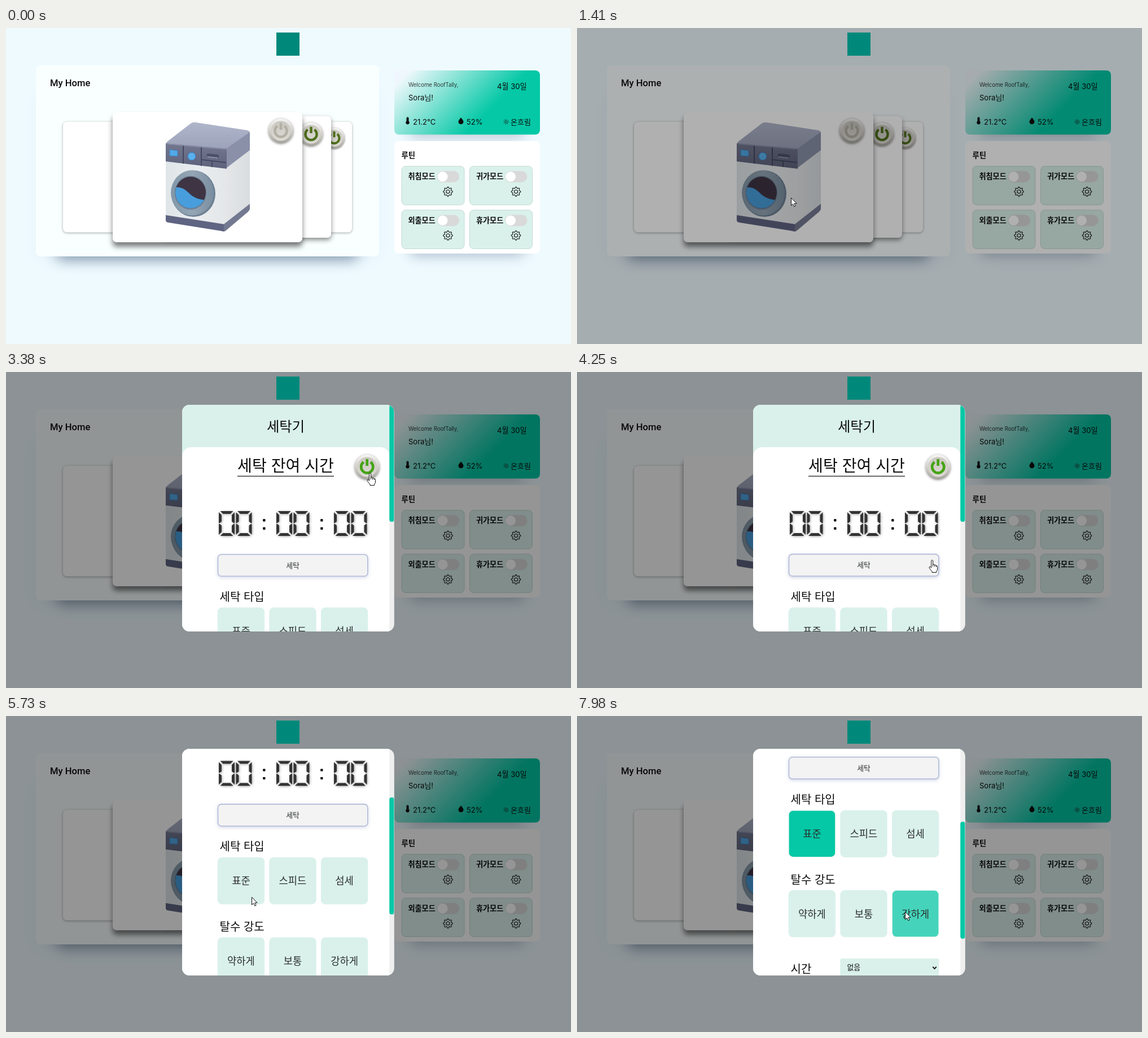
An HTML page for the animation above (8000 ms loop, 1001 by 559 pixels).

```html
<!DOCTYPE html>
<html lang="ko">
<head>
<meta charset="utf-8">
<title>Smart home</title>
<style>
html, body { margin: 0; width: 100%; height: 100%; overflow: hidden; background: #effaff; }
svg { display: block; width: 100vw; height: 100vh; }
text { font-family: Inter, "Noto Sans CJK KR", "Noto Sans CJK", sans-serif; fill: #0b0b0b; }
.mid { text-anchor: middle; }
.thin { fill: #2a2e2d; }
.title { font-family: Roboto, sans-serif; }
.card { fill: #fff; filter: drop-shadow(0 1px 2px rgba(0,0,0,.35)); }
.card.near { filter: drop-shadow(0 4px 4px rgba(0,0,0,.45)); }
.card.front { filter: drop-shadow(0 8px 5px rgba(0,0,0,.5)); }
.knob { filter: drop-shadow(0 1px 2px rgba(0,0,0,.45)); }
.sym { fill: none; stroke-width: 4.6; }
.cursor { fill: #fff; stroke: #111; stroke-linejoin: round; }
.digits { fill: #333; filter: drop-shadow(1px 1px 2px rgba(0,0,0,.35)); }
</style>
</head>
<body>
<svg id="stage" viewBox="0 0 1001 559" preserveAspectRatio="none"></svg>
<script>
const TEAL = '#04c8a6', MINT = '#daf1eb';
const OFF = '#b3b0a5', OLIVE = '#4f701b';
const LOOP = 8000, NOTCH = 83.3;

const rect = (x, y, w, h, r, fill, more = '') =>
  `<rect x="${x}" y="${y}" width="${w}" height="${h}" rx="${r}" fill="${fill}" ${more}/>`;
const label = (x, y, size, str, weight = 400, more = '') =>
  `<text x="${x}" y="${y}" font-size="${size}" font-weight="${weight}" ${more}>${str}</text>`;
const path = (d, fill, more = '') => `<path d="${d}" fill="${fill}" ${more}/>`;
const MID = 'class="mid"', THIN = 'class="mid thin"';

function power(x, y, scale, color, id = '') {
  const arc = 'M-6.2 -8.6A10.6 10.6 0 1 0 6.2 -8.6M0 -14V-2';
  return `<g transform="translate(${x} ${y}) scale(${scale})">
    <circle class="knob" r="22" fill="url(#knob)"/>
    <circle r="17.5" fill="url(#dish)"/>
    <path class="sym" d="${arc}" stroke="${color}"/>
    ${id && `<path class="sym" id="${id}" d="${arc}" stroke="#45a414"/>`}</g>`;
}

function gearPath() {
  let d = '';
  for (let i = 0; i < 64; i++) {
    const a = i / 64 * Math.PI * 2;
    const r = 7.2 + Math.max(-1, Math.min(1, 1.8 * Math.cos(8 * a)));
    d += (i ? 'L' : 'M') + (r * Math.cos(a)).toFixed(2) + ' ' + (r * Math.sin(a)).toFixed(2);
  }
  return d + 'Z';
}

function routine(x, y, name) {
  return `<g transform="translate(${x} ${y})">
    ${rect(.5, .5, 111, 68.5, 7, MINT, 'stroke="#c3dad5"')}
    ${label(12, 23, 13.1, name, 700)}
    ${rect(63, 9, 39.5, 20, 10, '#d9d9d9')}
    <circle cx="73" cy="19" r="9" fill="#fff"/>
    <g transform="translate(82.5 45.5)" fill="none" stroke="#111" stroke-width="1.1" stroke-linejoin="round">
      <path d="${gearPath()}"/><circle r="3"/></g></g>`;
}

function washer() {
  return `
    ${path('M283 205Q284 202 287 200L327 169Q331 166 336 167L428 181Q432 182 432 187L391 215Z', 'url(#lid)')}
    ${path('M391 213L432 184V217L391 249Z', '#8a90a8')}
    ${path('M390 248L432 216V312L386 348Z', 'url(#side)')}
    ${path('M283 235L391 248L387 349L283 332Z', 'url(#face)')}
    ${path('M283 331L386 347V360Q384 360 381 359L287 344Q283 343 283 340Z', '#5f6482')}
    ${path('M386 347L432 311V320Q432 322 429 325L390 358Q388 360 386 360Z', '#737990')}
    ${path('M283 204L388 213Q391 213 391 217V249L283 236Z', 'url(#panel)')}
    <path d="M314 207V240M346 210V244M347 233L390 238M365 236V246" stroke="#444860" stroke-width="2" fill="none"/>
    <path d="M285 205L388 214" stroke="#8d92ab" stroke-width="1.5"/>
    ${path('M290 215L304 217V227L290 226Z', '#53a9e6', 'stroke="#3f7fbd" stroke-linejoin="round"')}
    <circle cx="329" cy="227" r="7" fill="#58b0ec" stroke="#3e78b4"/>
    ${path('M357 222L376 224Q379 230 374 231L358 229Q354 226 357 222Z', '#4b5069')}
    <path d="M357 228L375 230" stroke="#8d92aa" stroke-width="2"/>
    <ellipse cx="332" cy="293" rx="39" ry="41" fill="#6d8093"/>
    <ellipse cx="330" cy="291.5" rx="38" ry="40" fill="url(#ring)"/>
    <ellipse cx="327" cy="291.5" rx="28.5" ry="30" fill="#71859a"/>
    <g clip-path="url(#glass)">
      <rect x="295" y="255" width="70" height="75" fill="#3e3444"/>
      ${path('M295 284C305 279 315 283 323 291S339 304 360 305V330H295Z', '#489edc')}
    </g>`;
}

function zero(x) {
  const bar = 'M2.5 0H25.5L20.5 5H7.5Z', side = 'M0 2L5 7V18.5L1.5 21.2H0Z';
  const flip = (sx, sy) => `transform="translate(${sx < 0 ? 28 : 0} ${sy < 0 ? 44 : 0}) scale(${sx} ${sy})"`;
  let out = '';
  for (const sy of [1, -1]) {
    out += `<path d="${bar}" ${flip(1, sy)}/>`;
    for (const sx of [1, -1]) out += `<path d="${side}" ${flip(sx, sy)}/>`;
  }
  return `<g transform="translate(${x} 246)">${out}</g>`;
}

function choices(y, names, picked, id) {
  return names.map((name, i) => {
    const x = 374.7 + i * 91.6;
    const glow = i === picked ? rect(x + 1, y + 1, 81.4, 81.2, 7, TEAL, `id="${id}"`) : '';
    return rect(x, y, 83.4, 83.2, 8, MINT) + glow + label(x + 41.7, y + 48.5, 17.7, name, 300, THIN);
  }).join('');
}

const gradient = (id, coords, stops) =>
  `<linearGradient id="${id}" ${coords}>${stops.map(([o, c]) => `<stop offset="${o}" stop-color="${c}"/>`).join('')}</linearGradient>`;
const DOWN = 'x1="0" y1="0" x2="0" y2="1"';

const defs = `<defs>
  ${gradient('knob', DOWN, [[0, '#f6f6f4'], [.5, '#d3d1cb'], [1, '#a5a39b']])}
  ${gradient('dish', DOWN, [[0, '#c9c7bf'], [1, '#dddbd5']])}
  ${gradient('lid', DOWN, [[0, '#b0b6ca'], [1, '#9ca2b9']])}
  ${gradient('panel', DOWN, [[0, '#73788f'], [1, '#5e627b']])}
  ${gradient('face', '', [[0, '#dfe5e8'], [.5, '#e9edef'], [1, '#e4e7e9']])}
  ${gradient('side', '', [[0, '#e5e7e8'], [1, '#d8dde0']])}
  ${gradient('ring', '', [[0, '#8297a8'], [.5, '#94a6b5'], [1, '#7a8ea1']])}
  ${gradient('hello', 'gradientUnits="userSpaceOnUse" x1="688" y1="75" x2="808" y2="195"',
    [[0, '#f3f5ff'], [.12, '#eef8fb'], [1, TEAL]])}
  <clipPath id="glass"><ellipse cx="327" cy="291" rx="27" ry="28"/></clipPath>
  <clipPath id="frame"><rect x="312" y="58" width="375.5" height="401" rx="13"/></clipPath>
  <filter id="soft" x="-20%" y="-100%" width="140%" height="300%"><feGaussianBlur stdDeviation="12"/></filter>
</defs>`;

const home = `
  ${rect(0, 0, 1001, 559, 0, '#effaff')}
  ${rect(90, 372, 533, 38, 8, '#3c5878', 'opacity=".62" filter="url(#soft)"')}
  ${rect(55, 120, 604, 288, 8, '#8fb0c8', 'opacity=".1" filter="url(#soft)"')}
  ${rect(53, 66, 608, 338, 8, '#f9ffff')}
  ${label(78, 103, 16.6, 'My Home', 500, 'class="title"')}
  ${rect(101, 166, 300, 195.5, 7, '#fff', 'class="card"')}
  ${rect(313, 166, 300, 195.5, 7, '#fff', 'class="card"')}
  ${power(581.5, 195, .85, OLIVE)}
  ${rect(276, 156, 300, 215, 7, '#fff', 'class="card near"')}
  ${power(540.5, 188, .95, OLIVE)}
  ${rect(189, 149, 336, 230, 7, '#fff', 'class="card front"')}
  ${power(487, 182, 1, OFF)}
  ${washer()}
  ${rect(715, 168, 204, 24, 8, '#3c5878', 'opacity=".35" filter="url(#soft)"')}
  ${rect(715, 374, 204, 28, 8, '#3c5878', 'opacity=".4" filter="url(#soft)"')}
  ${rect(688, 75, 258, 113.5, 8, 'url(#hello)')}
  ${label(713, 103.5, 9.7, 'Welcome RoofTally,', 300)}
  ${label(713, 128, 13, 'Sora님!')}
  ${label(870, 108, 13.1, '4월 30일')}
  ${path('M709.5 159.5a2 2 0 0 1 4 0v5.2a3.3 3.3 0 1 1-4 0Z', '#0b0b0b')}
  ${label(721, 170.5, 13, '21.2°C')}
  ${path('M806 158.5Q810.5 163.5 810.5 166a4.5 4.3 0 0 1-9 0Q801.5 163.5 806 158.5Z', '#0b0b0b')}
  ${label(816, 170.5, 13, '52%')}
  <g transform="translate(886 166)" fill="none" stroke="#222" stroke-width=".9"><circle r="2"/>
    <circle r="3.9" stroke-dasharray="1 2.06" stroke-width="1.4"/></g>
  ${label(894, 170.5, 13, '온흐림')}
  ${rect(688, 200, 258, 199, 8, '#fff')}
  ${label(700.5, 229.5, 13.3, '루틴', 700)}
  ${routine(700.5, 244, '취침모드')}${routine(821, 244, '귀가모드')}
  ${routine(700.5, 321.5, '외출모드')}${routine(821, 321.5, '휴가모드')}`;

const colon = x => rect(x - 2.2, 260, 4.4, 4.4, 1, '#111') + rect(x - 2.2, 274.5, 4.4, 4.4, 1, '#111');

const modal = `<g id="modal" clip-path="url(#frame)">
  ${rect(312, 58, 376, 401, 0, '#fff')}
  <g id="content">
    ${rect(312, 58, 367.5, 100, 0, MINT)}
    ${label(495.5, 104.5, 24.3, '세탁기', 300, MID)}
    ${rect(312, 133, 367.5, 700, 16, '#fff')}
    ${label(495.5, 175.5, 28.1, '세탁 잔여 시간', 300, MID)}
    ${rect(410, 183.7, 171, 1.2, 0, '#111')}
    ${power(639.7, 168, 1, OFF, 'powerOn')}
    <g class="digits">${[377, 407.5, 479, 509.5, 581, 611.5].map(zero).join('')}</g>
    ${colon(457.3)}${colon(559.3)}
    <g id="start">
      ${rect(375.5, 322.7, 265.3, 38.6, 6, '#f3f3f3', 'stroke="#b1bad9" stroke-width="1.6"')}
      ${label(508, 346.5, 12.8, '세탁', 300, THIN)}
    </g>
    ${label(378.5, 405, 20, '세탁 타입')}
    ${choices(416.6, ['표준', '스피드', '섬세'], 0, 'typePick')}
    ${label(378.5, 546.7, 20, '탈수 강도')}
    ${choices(558, ['약하게', '보통', '강하게'], 2, 'spinPick')}
    ${label(378.5, 705, 20, '시간')}
    ${rect(466.3, 679, 175, 36, 3, MINT)}
    ${label(478.5, 699.2, 12.8, '없음')}
    <path d="M630.3 693.5L633.5 697L636.7 693.5" fill="none" stroke="#111" stroke-width="1.8"/>
  </g>
  ${rect(679.2, 58, 9, 401, 0, '#efefef')}
  ${rect(679.2, 58, 8.4, 207, 4, TEAL, 'id="thumb"')}
</g>`;

const pointer = `
  <path id="arrow" class="cursor" d="M0 0V13.6L3.1 10.7L5.3 15.5L7.6 14.5L5.4 9.9H9.7Z"/>
  <path id="hand" class="cursor" d="M-1.5 12V1.3a1.5 1.5 0 0 1 3 0V7.5q3-.9 3 1q2.6-.6 2.8 1.2q2.2-.3 2.2 1.8V15q0 3-2 5v1.5H0V20q-2-2-5-6.5q-.6-2 1-2.2q1.2.2 2.5 2ZM1.5 7.5V11M4.5 8.5V11.5M7.3 9.7V12"/>`;

document.getElementById('stage').innerHTML = defs + home +
  rect(0, 0, 1001, 559, 0, '#000', 'id="shade"') +
  rect(479, 8, 41, 41, 0, '#00897b') + modal + pointer;

const el = {};
for (const id of ['shade', 'modal', 'content', 'powerOn', 'start', 'typePick', 'spinPick', 'thumb', 'arrow', 'hand'])
  el[id] = document.getElementById(id);

const ramp = (t, a, b) => Math.max(0, Math.min(1, (t - a) / (b - a)));
const ease = u => u * u * (3 - 2 * u);
const step = (t, a, b) => ease(ramp(t, a, b));

// Pointer stops: time, x, y
const stops = [
  [390, 772, 556], [1070, 379.5, 300.5], [2170, 379.5, 300.5], [2510, 658, 176], [2630, 645, 179],
  [3420, 645, 179], [3650, 574, 326], [3730, 574, 326], [3850, 572, 336],
  [4110, 572, 336], [4320, 648.5, 332], [5450, 648.5, 332], [5730, 435.5, 320.5],
  [6400, 435.5, 320.5], [6760, 568, 346], [7370, 568, 346], [7640, 581.5, 346.5]
];

function pointerAt(t) {
  let [, x, y] = stops[0];
  for (let i = 1; i < stops.length; i++) {
    const u = step(t, stops[i - 1][0], stops[i][0]);
    x += (stops[i][1] - stops[i - 1][1]) * u;
    y += (stops[i][2] - stops[i - 1][2]) * u;
  }
  return [x, y];
}

function draw(t) {
  const scroll = NOTCH * (step(t, 4560, 4715) + step(t, 4960, 5300) + step(t, 6800, 7160));
  el.shade.setAttribute('opacity', .415 * ramp(t, 1208, 1480));
  el.modal.setAttribute('opacity', step(t, 1480, 1900));
  el.content.setAttribute('transform', `translate(0 ${-scroll})`);
  el.thumb.setAttribute('y', 58 + scroll * .516);
  el.powerOn.setAttribute('opacity', step(t, 2880, 3080));
  el.typePick.setAttribute('opacity', step(t, 5990, 6300));
  el.spinPick.setAttribute('opacity', ramp(t, 7760, 8080));

  const hover = step(t, 3700, 3850) - step(t, 4110, 4310);
  el.start.setAttribute('transform', `translate(0 ${-1.6 * hover})`);
  el.start.style.filter = `drop-shadow(0 ${2 + hover}px 3px rgba(70,85,150,${.22 + .18 * hover}))`;

  const [x, y] = pointerAt(t);
  const onCard = t < 1200 && x < 525 && y < 379;
  const onPower = t > 2100 && t < 4000 && Math.hypot(x - 640, y - 168) < 22;
  const onStart = t > 3700 && t < 4400 && x < 641 && y > 322;
  const isHand = onCard || onPower || onStart;
  for (const [node, on] of [[el.arrow, !isHand], [el.hand, isHand]]) {
    node.setAttribute('transform', `translate(${x} ${y})`);
    node.setAttribute('visibility', on && t >= 390 ? 'visible' : 'hidden');
  }
}

const began = performance.now();
function tick() {
  draw((performance.now() - began) % LOOP);
  requestAnimationFrame(tick);
}
tick();
</script>
</body>
</html>
```
